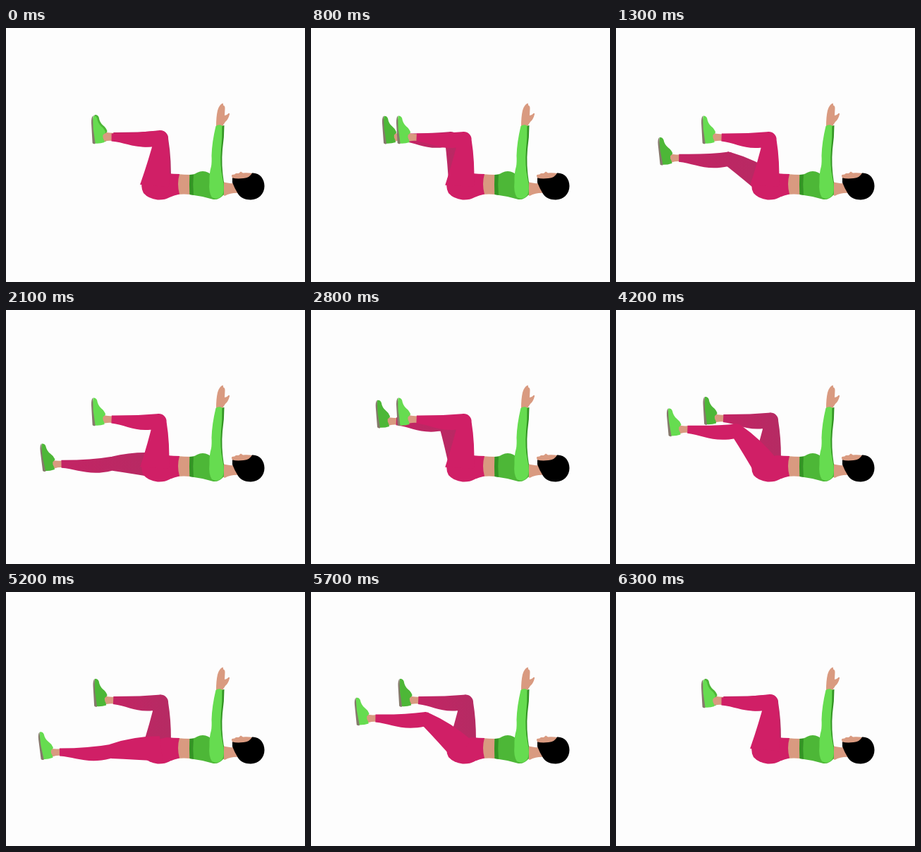
Recreate the animation shown at these times as an HTML page. Size 424 by 360 pixels, loop 6400 ms.

```html
<!DOCTYPE html>
<html lang="en">
<head>
<meta charset="utf-8">
<title>Dead bug exercise</title>
<style>
  html, body { margin: 0; width: 100%; height: 100%; overflow: hidden; background: #fdfdfd; }
  svg { display: block; width: 424px; height: 360px; }
  .skin { fill: #d99a80; }
  .lime { fill: #66dc50; }
  .green { fill: #4db737; }
  .forest { fill: #349425; }
  .pink { fill: #d01f66; }
  .plum { fill: url(#shade); }
  .sole { fill: #85796b; }
</style>
</head>
<body>
<svg viewBox="0 0 424 360">
  <defs>
    <linearGradient id="shade">
      <stop offset="0" stop-color="#c32464"/>
      <stop offset="1" stop-color="#b52b63"/>
    </linearGradient>
    <!-- Foot, relative to the ankle -->
    <g id="foot">
      <path class="skin" d="M2-5Q-6-4-13-7L-16 4-10 5.500Q-4 4 2 5z"/>
      <path d="M-26-30.500Q-22-31-20.500-27Q-19.500-20-14.500-15.500Q-10-12-8.500-7Q-10-5-12-3.500Q-13 0-10.500 4L-10 7Q-16 9-24 8.500Q-29-12-26-30.500z"/>
      <path class="sole" d="M-26.500-30.500Q-29-28-28.600-20L-27 8Q-25.500 9.700-23 9L-24.500-2Q-26.500-12-26.300-22z"/>
    </g>
  </defs>

  <g id="far">
    <use href="#foot" class="green"/>
    <path class="plum"/>
  </g>

  <path class="skin" d="M243 207Q252 208 262 208L262 236Q252 235 243 236z"/>
  <path class="pink" d="M200 213L228 206Q238 207 246 207Q242 221 246 235.500Q238 237 232 240Q225 244 215 243.500Q202 242 195 234Q190 225 194 212z"/>

  <g id="near">
    <use href="#foot" class="lime"/>
    <path class="pink"/>
  </g>

  <!-- Neck and head -->
  <path class="skin" d="M305 217Q314 221 322 220L321 212Q319 210 320.500 208L324 207.500 326 206 330 206 333 203.500 336 205.500Q342 205 350 206L346 222 331 234Q320 233 310 238L303 232z"/>
  <path d="M349 205.500C360 205 366.500 214 366.500 224C366.500 235 358 243.500 347 243.500C339 243.500 332 240 329 235Q324 227 321 219L321 212.500Q327 214 337 213Q346 212 349 205.500z"/>

  <!-- Top and arms -->
  <path class="green" d="M260.500 208Q267 208 271 205Q279 201 287 205L300 214 309 218 309 236Q302 244 294 243Q277 238 260.500 236z"/>
  <path class="forest" d="M260.500 208L266 207.700Q264.500 222 266 236.800L260.500 236Q259.500 222 260.500 208z"/>
  <path class="forest" d="M303 139L309.500 138Q309.500 155 307 172Q305 194 309 219L301 218z"/>
  <path class="skin" d="M298 139Q298 126 300 117Q302 109 307.500 106.500L308.500 110Q310.500 110 310.500 114L310 124Q313 124 315.500 121Q317.500 120 317 122.500Q315 130 311 133L307 139z"/>
  <path class="lime" d="M297.500 139Q302 136 306.500 138.500Q307 155 305 172Q303 194 307.500 215Q311 233 305 239Q299 244 292 240Q287 233 288.500 218Q288 206 291 196Q292 190 291.500 181Q292 162 297.500 139z"/>
</svg>

<script>
const LOOP = 6400, STEP = 100;

const ease = (t, from, to) => {
  const p = Math.min(1, Math.max(0, (t - from) / (to - from)));
  return (1 - Math.cos(Math.PI * p)) / 2;
};

// Maps local (along, front) coordinates of a limb to the stage.
const frame = (from, to) => {
  const a = Math.atan2(to.y - from.y, to.x - from.x), c = Math.cos(a), s = Math.sin(a);
  return (x, y) => `${(from.x + x * c - y * s).toFixed(2)} ${(from.y + x * s + y * c).toFixed(2)} `;
};

const span = (a, b) => Math.hypot(b.x - a.x, b.y - a.y);

function legPath(hip, knee, ankle, u) {
  const f = frame(hip, knee), g = frame(knee, ankle);
  const L = span(hip, knee), S = span(knee, ankle), r = 11 - u;
  const thigh = 'M' + f(-6, 18 - 5 * u) + 'Q' + f(L / 2, 17.5) + f(L, r) +
    'L' + f(L, -8 - 2 * u) + 'Q' + f(L / 2, -13.5 - 2 * u) + f(-6, -23) + 'Z';
  const cap = `M${knee.x - r} ${knee.y}a${r} ${r} 0 1 0 ${2 * r} 0a${r} ${r} 0 1 0 ${-2 * r} 0Z`;
  const shin = 'M' + g(0, r) + 'Q' + g(30, 7 - 2 * u) + g(S, 5.5) + 'L' + g(S, -5.5) +
    'C' + g(S - 22, -7) + g(32, -18) + g(0, -10) + 'Z';
  return thigh + cap + shin;
}

// u: 0 = knee over hip, 1 = leg straight; lift nudges the knee only.
function poseLeg(id, hip, u, lift) {
  const a = (87 + 90 * u + 10 * u ** 4) * Math.PI / 180, L = 60 + 6 * u;
  const knee = { x: hip.x + L * Math.cos(a), y: hip.y - L * Math.sin(a) };
  const ankle = { x: knee.x - 67 - 5 * u, y: knee.y - 3 + 4 * u ** 3 };
  knee.x += 2 * lift;
  knee.y -= 2 * lift;
  const leg = document.getElementById(id);
  leg.querySelector('path').setAttribute('d', legPath(hip, knee, ankle, u));
  leg.querySelector('use').setAttribute('transform',
    `translate(${ankle.x} ${ankle.y}) rotate(${-4 * u})`);
}

function draw(t) {
  const far = ease(t, 300, 1900) - ease(t, 1900, 3350);
  const near = ease(t, 3450, 4950) - ease(t, 5250, 6320);
  const lift = 1 - ease(t, 0, 700) + ease(t, 5250, 6320);
  poseLeg('far', { x: 216, y: 216.5 }, far, 0);
  poseLeg('near', { x: 213.5, y: 218 }, near, lift);
}

const start = performance.now();
function tick() {
  const t = (performance.now() - start) % LOOP;
  draw(Math.floor(t / STEP) * STEP);
  requestAnimationFrame(tick);
}
tick();
</script>
</body>
</html>
```
